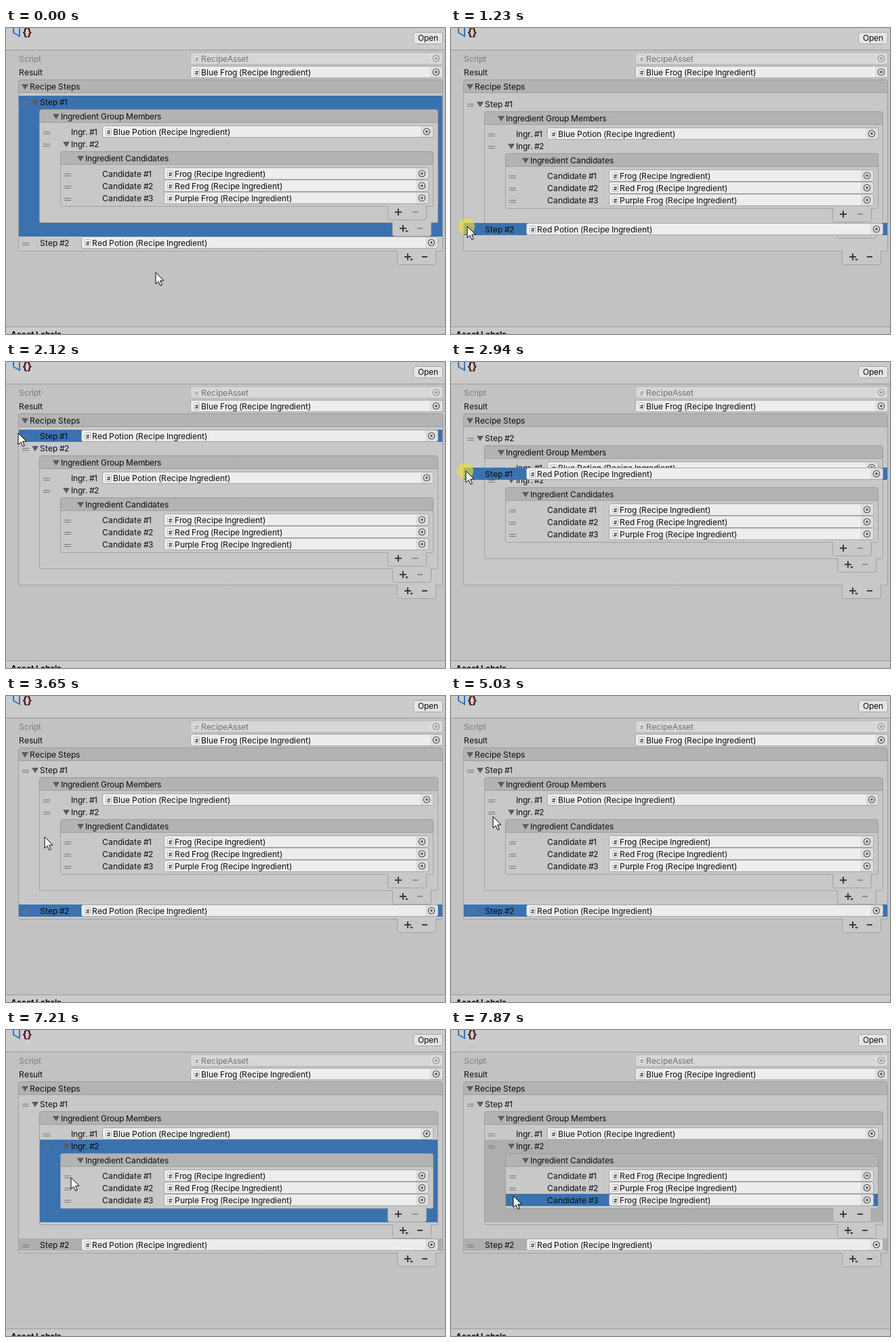
Recreate the animation shown at these times as an HTML page with a canvas. Size 648 by 452 pixels, loop 8 s.

```html
<!DOCTYPE html>
<html lang="en">
<head>
<meta charset="utf-8">
<title>Nested reorderable lists</title>
<style>
html, body { margin: 0; width: 100%; height: 100%; overflow: hidden; background: #c2c2c2; }
canvas { display: block; }
</style>
</head>
<body>
<canvas id="stage" width="648" height="452"></canvas>
<script>
const ctx = document.getElementById('stage').getContext('2d');
const LOOP = 8000, ROW = 18, HEADER = 20, PAD = 4;
const BLUE = '#3a72b0', GREY = '#aeaeae', INK = '#0c0c0c', ICON = '#3c3c3c';
const FONT = '12px Inter, "Open Sans", sans-serif';

// Pointer moves: start, end, x, y, ease-out power
const MOVES = [
  [30, 380, 62, 282], [380, 670, 27, 323], [820, 1000, 25, 313],
  [1150, 2000, 18, 108, 1], [2000, 2120, 18, 105], [2710, 3500, 32, 298, 1],
  [3500, 3970, 79, 131], [4340, 4570, 84, 197], [4750, 5250, 57, 174],
  [5450, 5900, 57, 156], [6130, 6800, 57, 174], [6980, 7210, 96, 218],
  [7250, 7340, 91, 214], [7400, 7770, 92, 245]
];

// Mouse button held: the four drags
const DRAG = {
  up: [1150, 2000], down: [2430, 3490], ingr: [5300, 6900], cand: [7340, 7800]
};

const clamp = (v, a, b) => Math.max(a, Math.min(b, v));
const during = (t, [a, b]) => t >= a && t < b;
const slide = (t, from) => t < from ? 0 : 1 - Math.exp((from - t) / 85);

function pointerAt(t) {
  let x = 221, y = 361;
  for (const [from, to, toX, toY, power = 2] of MOVES) {
    const u = 1 - (1 - clamp((t - from) / (to - from), 0, 1)) ** power;
    x += (toX - x) * u;
    y += (toY - y) * u;
  }
  return { x: Math.round(x), y: Math.round(y) };
}

// Distance dragged since the button went down
function dragged(t, span, min, max) {
  return during(t, span) ? clamp(pointerAt(t).y - pointerAt(span[0]).y, min, max) : 0;
}

function rect(x, y, w, h, fill) {
  ctx.fillStyle = fill;
  ctx.fillRect(x, y, w, h);
}

function box(x, y, w, h, r, fill, stroke) {
  ctx.beginPath();
  ctx.roundRect(x + .5, y + .5, w - 1, h - 1, r);
  ctx.fillStyle = fill;
  ctx.fill();
  ctx.strokeStyle = stroke;
  ctx.lineWidth = 1;
  ctx.stroke();
}

function shape(points, fill) {
  ctx.beginPath();
  points.forEach(([x, y]) => ctx.lineTo(x, y));
  ctx.closePath();
  ctx.fillStyle = fill;
  ctx.fill();
}

function disc(x, y, r, fill) {
  ctx.beginPath();
  ctx.arc(x, y, r, 0, 7);
  ctx.fillStyle = fill;
  ctx.fill();
}

// Glyph advances snap to whole pixels, leaning narrow
function text(s, x, base, color = INK, font = FONT) {
  ctx.font = font;
  ctx.fillStyle = color;
  for (const ch of s) {
    ctx.fillText(ch, x, base);
    x += Math.floor(ctx.measureText(ch).width + .38);
  }
}

function foldout(label, x, cy) {
  shape([[x - 12, cy - 4], [x - 2, cy - 4], [x - 7, cy + 4]], '#5c5c5c');
  text(label, x, cy + 4);
}

function handle(x, row) {
  rect(x, row + 9, 10, 1, '#747474');
  rect(x, row + 12, 10, 1, '#747474');
}

function field(label, x, right, row, off) {
  ctx.save();
  if (off) ctx.globalAlpha = .5;
  box(x, row, right - x, ROW, 2.5, '#ededed', '#a6a6a6');
  rect(right - 19, row + 1, 17, ROW - 2, '#dedede');
  box(x + 5, row + 4, 9, 11, 1, '#f8f8f8', '#b4b4b4');
  text('#', x + 7, row + 13, '#333', 'bold 8px Inter, sans-serif');
  text(label, x + 16, row + 14);
  ctx.beginPath();
  ctx.arc(right - 10, row + 9, 4.7, 0, 7);
  ctx.strokeStyle = '#484848';
  ctx.lineWidth = 1.1;
  ctx.stroke();
  disc(right - 10, row + 9, 1.7, '#484848');
  ctx.restore();
}

function footer(right, y, menu, canRemove) {
  const x = right - 68;
  box(x, y - 1, 58, 21, [0, 0, 3, 3], '#c8c8c8', '#a0a0a0');
  rect(x + 1, y - 1, 56, 1, '#c8c8c8');
  rect(x + 11, y + 7, 10, 2, ICON);
  rect(x + 15, y + 3, 2, 10, ICON);
  if (menu) shape([[x + 19, y + 11], [x + 24, y + 11], [x + 21.5, y + 14]], ICON);
  rect(x + 37, y + 7, 8, 2, canRemove ? ICON : '#8c8c8c');
}

// Returns the top of the first row
function list(title, left, right, y, content, textX, menu, canRemove) {
  const body = y + HEADER, height = content + 2 * PAD;
  box(left, body - 1, right - left, height + 1, [0, 0, 2, 2], '#c8c8c8', '#a0a0a0');
  box(left, y, right - left, HEADER, [3, 3, 0, 0], '#b3b3b3', '#9b9b9b');
  foldout(title, textX, y + 11);
  footer(right, body + height, menu, canRemove);
  return body + PAD;
}

function candidate(name, n, row, fill) {
  if (fill) rect(81, row, 549, ROW, fill);
  handle(86, row);
  text('Candidate #' + n, 142, row + 14);
  field(name + ' (Recipe Ingredient)', 233, 624, row);
}

function candidates(t, y) {
  const picked = t >= DRAG.cand[0], moved = t >= DRAG.cand[1];
  const top = list('Ingredient Candidates', 80, 631, y, 3 * ROW, 117, false, picked);
  const number = i => moved ? (i + 2) % 3 + 1 : i + 1;
  ['Red Frog', 'Purple Frog'].forEach((name, i) => {
    const up = moved ? 1 : slide(t, 7460 + 180 * i);
    candidate(name, number(i + 1), Math.round(top + ROW * (i + 1 - up)));
  });
  const shift = moved ? 2 * ROW : dragged(t, DRAG.cand, 0, 2 * ROW);
  candidate('Frog', number(0), top + shift, picked && BLUE);
}

function group(t, top, n, selected) {
  const picked = t >= DRAG.ingr[0];
  if (selected) rect(19, top, 625, 208, BLUE);
  handle(24, top);
  foldout('Step #' + n, 50, top + 10);
  const rows = list('Ingredient Group Members', 49, 638, top + 20, 140, 81, true, picked);

  const push = 122 * slide(t, 5586) * (1 - slide(t, 6326));
  const first = Math.round(rows + push);
  handle(55, first);
  text('Ingr. #1', 96, first + 14);
  field('Blue Potion (Recipe Ingredient)', 142, 631, first);

  const second = rows + ROW + dragged(t, DRAG.ingr, -ROW, 0);
  if (picked) rect(50, second, 587, 122, t < DRAG.cand[0] ? BLUE : GREY);
  handle(55, second);
  foldout('Ingr. #2', 96, second + 10);
  candidates(t, second + 20);
}

function steps(t, top) {
  const swapped = t >= DRAG.up[1] && t < DRAG.down[1];
  const push = swapped ? 1 - slide(t, 2780) : t < DRAG.up[1] ? slide(t, 1215) : 0;
  const row = swapped ? top + dragged(t, DRAG.down, 0, 208)
    : top + 208 + dragged(t, DRAG.up, -208, 0);
  group(t, Math.round(top + ROW * push), swapped ? 2 : 1, t < DRAG.up[0]);
  if (t >= DRAG.up[0]) rect(19, row, 625, ROW, t < DRAG.ingr[0] ? BLUE : GREY);
  handle(24, row);
  text('Step #' + (swapped ? 1 : 2), 50, row + 14);
  field('Red Potion (Recipe Ingredient)', 111, 638, row);
}

function assetIcon() {
  ctx.strokeStyle = '#2f78c4';
  ctx.lineWidth = 2;
  ctx.beginPath();
  ctx.moveTo(11, 0);
  ctx.lineTo(11, 7);
  ctx.lineTo(20, 12);
  ctx.lineTo(20, 0);
  ctx.stroke();
  text('{}', 24, 12, '#4a1018', 'bold 16px Inter, sans-serif');
}

function inspector() {
  rect(0, 0, 648, 452, '#c2c2c2');
  rect(0, 0, 648, 32, '#cbcbcb');
  rect(0, 32, 648, 1, '#999');
  assetIcon();
  box(601, 6, 44, 18, 3, '#e4e4e4', '#a8a8a8');
  text('Open', 608, 19);
  text('Script', 19, 50, '#7c7c7c');
  field('RecipeAsset', 272, 645, 36, true);
  text('Result', 19, 70);
  field('Blue Frog (Recipe Ingredient)', 272, 645, 56);
  rect(0, 441, 648, 1, '#999');
  rect(0, 442, 648, 10, '#cbcbcb');
  text('Asset Labels', 7, 457, INK, 'bold 12px Inter, sans-serif');
}

function pointer(t) {
  const { x, y } = pointerAt(t);
  if (Object.values(DRAG).some(span => during(t, span))) {
    disc(x - 1, y, 12, 'rgba(238, 228, 50, .62)');
  }
  const arrow = [[0, 0], [0, 17], [4, 13.4], [6.8, 19.6], [9.4, 18.5], [6.6, 12.4], [12, 12]];
  shape(arrow.map(([a, b]) => [x + a, y + b]), '#fff');
  ctx.strokeStyle = '#000';
  ctx.lineWidth = 1;
  ctx.stroke();
}

function draw(t) {
  inspector();
  steps(t, list('Recipe Steps', 18, 645, 76, 226, 35, true, true));
  pointer(t);
}

const start = performance.now();
function tick() {
  draw((performance.now() - start) % LOOP);
  requestAnimationFrame(tick);
}
tick();
</script>
</body>
</html>
```
